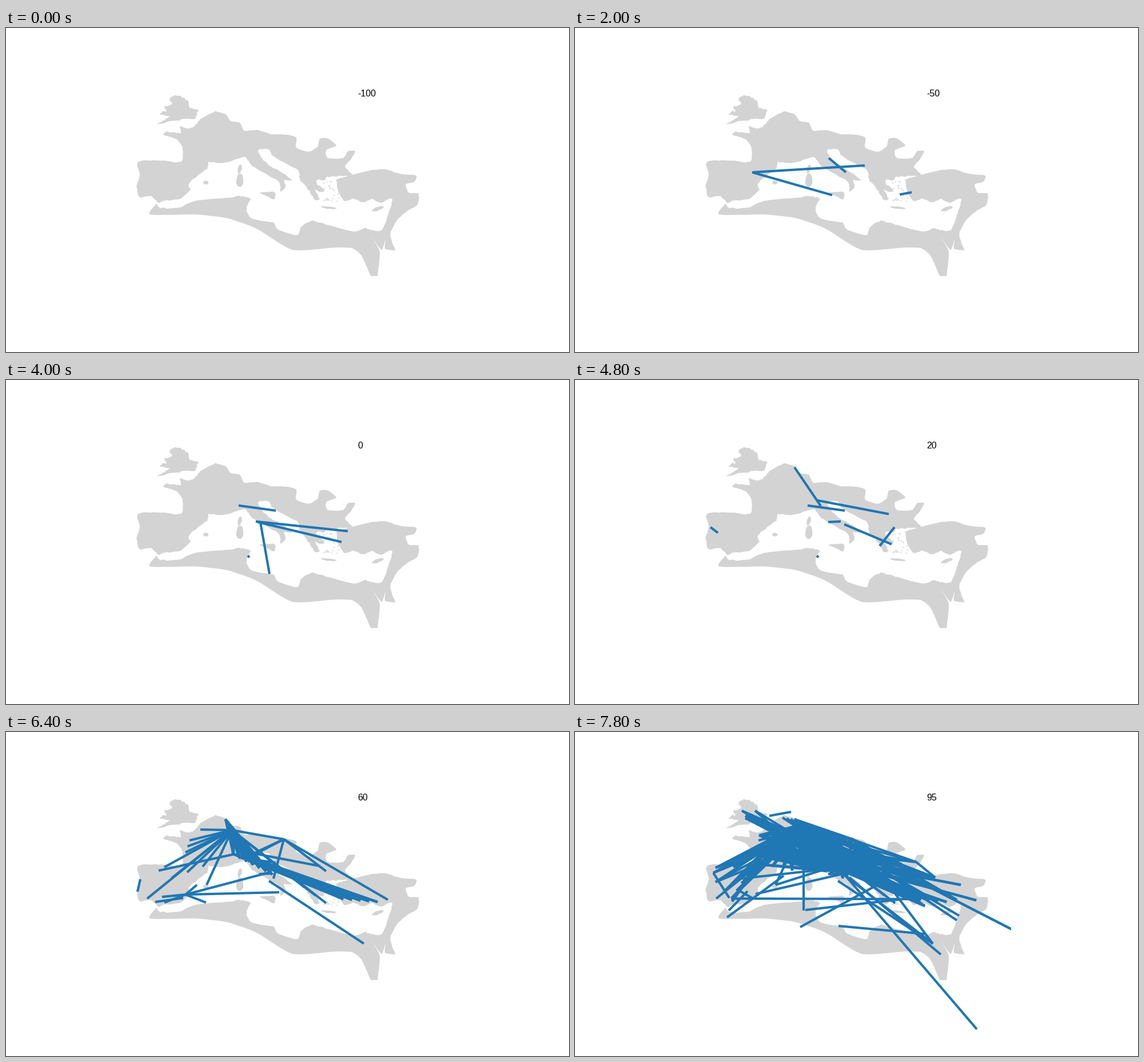
Write a matplotlib script that moves like this. It is 985 px wide and 568 px high and loops after 8000 ms.

```python
from itertools import product

import matplotlib.pyplot as plt
import numpy as np
from matplotlib.animation import FuncAnimation
from matplotlib.collections import LineCollection, PolyCollection
from matplotlib.patches import Rectangle

W, H, DPI = 985, 568, 100
FIRST, STEP, FRAMES = -100, 5, 40
LAND, LINK = "#d3d3d3", "#1f77b4"
rng = np.random.default_rng(7)


def curve(points, rough=0.5, n=5):
    """Soft curve through key points with a slightly ragged edge."""
    p = np.array(points, float)
    m = 0.6 * np.gradient(p, axis=0)
    t = np.linspace(0, 1, n, endpoint=False)[:, None]
    parts = [
        (2*t**3 - 3*t**2 + 1) * p[i] + (t**3 - 2*t**2 + t) * m[i]
        + (3*t**2 - 2*t**3) * p[i + 1] + (t**3 - t**2) * m[i + 1]
        for i in range(len(p) - 1)
    ]
    xy = np.vstack(parts + [p[-1:]])
    return xy + rng.normal(0, rough, xy.shape)


def island(x, y, rx, ry, tilt=0.0, rough=0.4, n=14):
    a = np.linspace(0, 2 * np.pi, n, endpoint=False)
    u, v = rx * np.cos(a), ry * np.sin(a)
    c, s = np.cos(tilt), np.sin(tilt)
    xy = np.column_stack([x + c * u - s * v, y + s * u + c * v])
    return xy + rng.normal(0, rough, xy.shape)


# Key points of the coasts and borders, in stage pixels
atlantic = curve([
    (228, 278), (234, 258), (230, 238), (237, 233), (262, 232), (303, 235),
    (309, 229), (309, 211), (300, 196), (275, 187), (283, 182), (306, 184),
    (304, 173), (322, 176), (334, 168), (340, 160), (366, 146)])
rivers = curve([
    (366, 146), (384, 151), (393, 163), (409, 166), (417, 180), (440, 179),
    (464, 186), (490, 187), (508, 192), (508, 210), (530, 217), (545, 208),
    (549, 194), (562, 193), (578, 206), (560, 214), (563, 228), (590, 228),
    (598, 216), (611, 216), (602, 232), (593, 243), (606, 257)], 0.2)
aegean = curve([
    (597, 259), (580, 260), (562, 261), (555, 268), (543, 266), (546, 277),
    (554, 288), (540, 284), (549, 300), (540, 302), (530, 286), (526, 281),
    (514, 265), (512, 250), (480, 233), (466, 223), (461, 214)], 0.8)
italy = curve([
    (455, 212), (441, 214), (446, 226), (460, 241), (479, 251), (501, 267),
    (487, 267), (489, 278), (480, 287), (478, 270), (440, 248), (428, 239),
    (418, 226), (396, 233), (378, 237), (354, 234)])
iberia = curve([
    (352, 246), (328, 264), (320, 274), (322, 285), (304, 300), (277, 302),
    (267, 307), (254, 295), (233, 297), (230, 281)])
anatolia = curve([
    (577, 266), (607, 257), (640, 249), (664, 248), (690, 256), (718, 259),
    (714, 270), (699, 274), (705, 289), (722, 290), (720, 310), (700, 322),
    (684, 337), (672, 362), (681, 390)], 0.3)
sinai = curve([
    (681, 390), (663, 387), (664, 371), (657, 389), (640, 367), (654, 392),
    (650, 435)], 0)
sahara = curve([
    (638, 435), (622, 399), (605, 386), (575, 385), (501, 389), (437, 351),
    (385, 333), (330, 327), (252, 327), (263, 308)], 0.1)
maghreb = curve([
    (263, 308), (270, 315), (304, 315), (330, 303), (385, 298), (412, 295),
    (428, 299), (420, 317), (430, 334), (468, 342), (475, 353), (510, 363),
    (517, 348), (535, 338), (566, 346), (610, 357), (626, 351), (639, 354),
    (658, 354), (673, 313), (675, 299), (655, 306), (639, 300), (624, 306),
    (608, 299), (592, 303), (582, 288), (577, 266)])
britain = curve([
    (285, 124), (298, 118), (315, 126), (322, 141), (337, 144), (330, 158),
    (303, 161), (264, 168), (287, 156), (268, 151), (281, 145), (276, 138),
    (291, 134), (285, 124)], 0.8)

shapes = [
    np.vstack([atlantic, rivers, aegean, italy, iberia]),
    np.vstack([anatolia, sinai, sahara, maghreb]),
    britain,
    curve([(443, 289), (470, 287), (468, 300), (443, 289)]),
    island(409, 267, 6, 12), island(409, 247, 3.5, 8, 0.2),
    island(350, 271, 5, 3), island(565, 315, 14, 2, 0.1),
    island(650, 317, 11, 3, -0.3), island(551, 281, 8, 2, 0.8),
]
for x, y in zip(rng.uniform(554, 584, 26), rng.uniform(269, 305, 26)):
    shapes.append(island(x, y, 1.7, 0.9, rng.uniform(0, 3), 0.2, 6))

# Links: (start point, end point, first year, year of removal)
links = []


def link(x0, y0, x1, y1, since, until=200):
    links.append(((x0, y0), (x1, y1), since, until))


def along(a, b, n):
    """n points evenly spaced from a to b."""
    return [tuple(p) for p in np.linspace(a, b, n)]


def web(starts, ends, since, by, until=200):
    """Join every start to every end, each from a random year in the span."""
    for a, b in product(starts, ends):
        year = int(rng.choice(np.arange(since, by + 1, STEP)))
        links.append((a, b, year, until))


# Sparse early years
link(310, 253, 507, 241, -85, -30)
link(310, 253, 450, 293, -75, -35)
link(444, 228, 474, 253, -60, -40)
link(568, 292, 589, 288, -65, -40)
link(372, 211, 442, 249, -45, -5)
link(419, 217, 446, 211, -35, 0)
link(437, 248, 598, 265, -30, 5)
link(440, 249, 587, 284, -30, 10)
link(423, 311, 426, 308, -15, 40)
link(237, 258, 250, 268, 5, 35)
link(384, 153, 430, 221, 10)
link(424, 211, 549, 235, 10)
link(407, 220, 472, 229, 0)
link(443, 249, 465, 248, 5)
link(471, 253, 554, 288, 15, 45)
link(533, 291, 559, 258, 10, 40)
for start in (0, 35):
    link(461, 340, 445, 249, start, start + 10)

FORT, MAINZ, CAMP = (384, 153), (395, 172), (486, 188)
CARTAGENA, DELTA = (314, 285), (626, 371)
RHINE = along(FORT, (399, 180), 4)
ALPS = along((398, 214), (440, 224), 4)
ITALY = along((398, 216), (466, 250), 7)
ANATOLIA = along((590, 293), (650, 298), 5)

# Military build-up
web(RHINE, ITALY, 30, 60)
web(RHINE[2:], along((397, 215), (445, 236), 6), 30, 60)
web([MAINZ], [(340, 171), (277, 237), (247, 292), (351, 268), CAMP], 35, 60)
web([MAINZ], along((321, 190), (314, 211), 3), 35, 60)
web([MAINZ], along((290, 256), (344, 236), 3), 35, 60)
web([MAINZ], along((523, 273), (560, 300), 3), 35, 60)
web(ALPS, ANATOLIA, 35, 60)
web(ALPS, [(541, 265)], 35, 60)
web([CAMP], [(668, 294), (560, 244), (468, 257)], 40, 50)
web([CAMP], along((420, 219), (440, 212), 3), 40, 60)
web([CARTAGENA], [(478, 281), (465, 245), (334, 268), (350, 299)], 35, 60, 70)
web([CARTAGENA], along((273, 289), (277, 299), 2), 35, 60, 70)
link(261, 298, 310, 291, 45, 70)
link(267, 243, 400, 214, 50, 75)
link(230, 280, 235, 258, 40, 70)
link(460, 261, *DELTA, 60)

# Links spread along the northern frontier
PANNONIA = along(CAMP, (470, 240), 6)
GAUL = along((345, 178), (322, 232), 5)
MOSELLE = along((386, 165), (372, 205), 4)
EAST = along((630, 255), (612, 305), 4)
GALICIA = along((246, 238), (242, 247), 2)
web(RHINE, PANNONIA, 65, 80)
web(GAUL, MOSELLE, 65, 80)
web(GAUL[1:4], ALPS, 65, 80)
web(MOSELLE[1:], along((345, 236), (425, 228), 5), 65, 80)
web(MOSELLE[:3], GALICIA, 65, 80)
web(MOSELLE[1:3], along((315, 138), (298, 151), 3), 65, 80)
web(MOSELLE[1:3], along((274, 291), (300, 252), 4), 65, 80)
web(MOSELLE[:1], along((363, 150), (378, 152), 3), 65, 80)
web(ALPS + PANNONIA[2:5:2], EAST, 65, 80)
web([CAMP, (430, 180)], [(558, 228), (545, 262)], 65, 80)
web(ALPS[1:], [(675, 268), (702, 295)], 65, 80)
web([(545, 233), (550, 236)], [(770, 349)], 65, 80)
web([(530, 238)], along((672, 322), (668, 330), 2), 70, 80)
web([(470, 232)], along((445, 249), (478, 258), 4), 65, 80)
web([(436, 241)], [(351, 268), (290, 257)], 70, 80)
link(269, 313, 302, 279, 75)
link(285, 277, 310, 291, 70)
link(256, 262, 266, 278, 70, 90)
link(550, 270, *DELTA, 75)
link(461, 340, 612, 354, 75)

# Widest spread
web(RHINE[::2] + MOSELLE[2:], along((597, 228), (470, 246), 6), 85, 95)
web(MOSELLE, along((322, 181), (380, 243), 5), 85, 95)
web(MOSELLE[1:3], along((292, 138), (298, 147), 2), 85, 95)
web(GAUL[2:], along((246, 263), (275, 297), 3), 85, 95)
web(GAUL[2:], along((440, 244), (500, 246), 4), 85, 95)
web(PANNONIA[1:4], EAST[:2], 85, 95)
link(597, 228, 630, 255, 85)
link(340, 147, 378, 140, 90)
link(242, 247, 270, 291, 85)
link(266, 325, 365, 252, 90)
link(400, 235, 400, 313, 90)
link(403, 312, 600, 290, 95)
link(394, 342, 540, 262, 90)
link(273, 292, 600, 293, 85)
link(316, 284, 480, 246, 85)
link(480, 255, 640, 390, 90)
link(470, 250, *DELTA, 85)
link(470, 248, 703, 521, 95)

fig = plt.figure(figsize=(W / DPI, H / DPI), dpi=DPI, facecolor="white")
ax = fig.add_axes([0, 0, 1, 1])
ax.set(xlim=(0, W), ylim=(H, 0))
ax.axis("off")
ax.add_collection(PolyCollection(shapes, facecolors=LAND, edgecolors="none"))
lines = LineCollection([], colors=LINK, linewidths=3, zorder=3)
ax.add_collection(lines)
lines.set_clip_path(Rectangle((0, 0), 763, H, transform=ax.transData))
label = ax.text(615.3, 120.3, "", fontsize=11.5, family="Liberation Sans",
                color="black", va="baseline", zorder=4)


def draw(i):
    year = FIRST + STEP * i
    lines.set_segments([(a, b) for a, b, since, until in links
                        if since <= year < until])
    label.set_text(str(year))
    return lines, label


anim = FuncAnimation(fig, draw, frames=FRAMES, interval=200, repeat=True)
plt.show()
```
